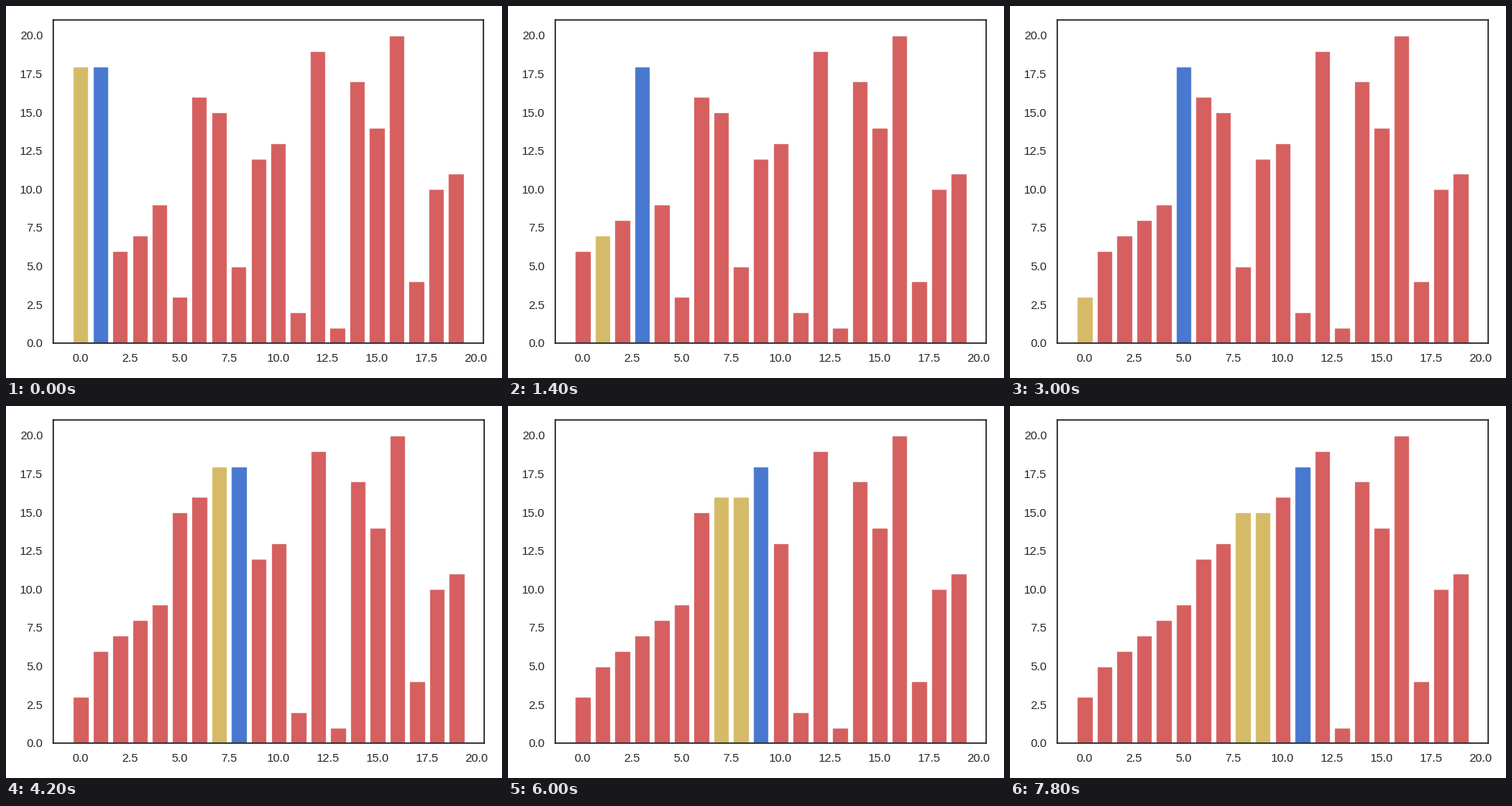
A matplotlib script that plays this animation: 640 px wide and 480 px high, repeating every 8 s.

```python
import matplotlib.pyplot as plt
from matplotlib.animation import FuncAnimation

RED, BLUE, YELLOW, INK = "#D65F5F", "#4878D0", "#D5BB67", "0.15"
START = [18, 8, 6, 7, 9, 3, 16, 15, 5, 12, 13, 2, 19, 1, 17, 14, 20, 4, 10, 11]
FRAMES, STEP_MS = 40, 200

plt.rcParams.update({
    "font.family": "Liberation Sans",
    "font.size": 12,
    "axes.edgecolor": INK,
    "axes.linewidth": 1.25,
    "text.color": INK,
    "patch.linewidth": 1,
})
for axis in "xy":
    plt.rcParams.update({
        f"{axis}tick.labelsize": 11,
        f"{axis}tick.color": INK,
        f"{axis}tick.major.size": 6,
        f"{axis}tick.major.pad": 3.5,
    })
plt.rcParams.update({"xtick.bottom": False, "ytick.left": False})


def insertion_sort(values):
    """Yield (values, touched indices, key index) after every write."""
    a = list(values)
    for i in range(1, len(a)):
        key, j = a[i], i - 1
        while j >= 0 and a[j] > key:
            a[j + 1] = a[j]
            yield a[:], (j, j + 1), i
            j -= 1
        a[j + 1] = key
        yield a[:], (j + 1,), i


steps = list(insertion_sort(START))[:FRAMES]

fig, ax = plt.subplots(figsize=(6.4, 4.8), dpi=100, facecolor="white")
bars = ax.bar(range(len(START)), START, color=RED, edgecolor="white")

# The layout settles on its second pass, after the opening frame.
layouts = []
for _ in range(2):
    fig.tight_layout()
    fig.canvas.draw()
    layouts.append(ax.get_position().frozen())


def draw(n):
    values, touched, key_index = steps[n]
    ax.set_position(layouts[min(n, 1)])
    for k, (bar, value) in enumerate(zip(bars, values)):
        bar.set_height(value)
        if k == key_index:
            bar.set_facecolor(BLUE)
        else:
            bar.set_facecolor(YELLOW if k in touched else RED)
    return list(bars)


anim = FuncAnimation(fig, draw, frames=FRAMES, interval=STEP_MS,
                     init_func=lambda: draw(0), repeat=True, repeat_delay=0)
plt.show()
```
